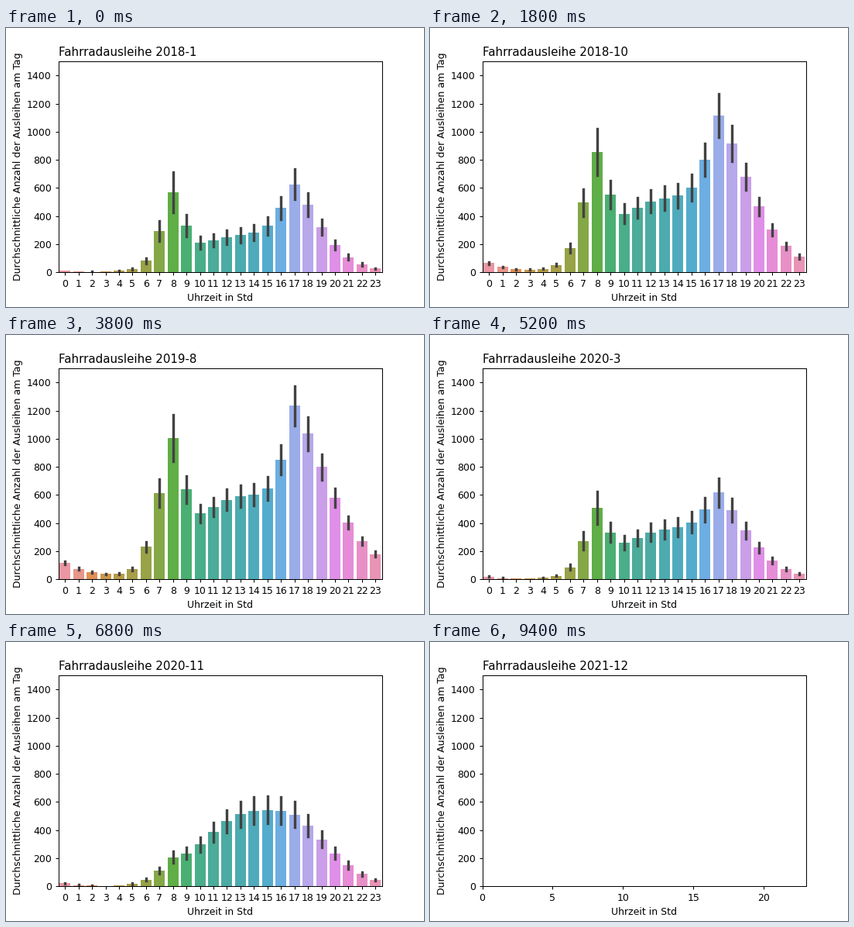
A matplotlib script for the animation above (9.6 s loop, 540x360 px).

```python
import colorsys
import math

import matplotlib.pyplot as plt
import numpy as np
from matplotlib.animation import FuncAnimation

HOURS = np.arange(24)
MONTHS = 48
FIRST_YEAR = 2018
NO_DATA = {27, 45, 46, 47}


def linear_rgb(hue, chroma, light):
    """CIE LCh(uv) to linear sRGB."""
    a = math.radians(hue)
    u = chroma * math.cos(a) / (13 * light) + 0.19784
    v = chroma * math.sin(a) / (13 * light) + 0.46834
    y = ((light + 16) / 116) ** 3
    x = y * 9 * u / (4 * v)
    z = y * (12 - 3 * u - 20 * v) / (4 * v)
    return np.array([
        3.2406 * x - 1.5372 * y - 0.4986 * z,
        -0.9689 * x + 1.8758 * y + 0.0415 * z,
        0.0557 * x - 0.2040 * y + 1.0570 * z,
    ])


def bar_color(i, sat=0.9 * 99, light=0.7 * 99):
    """Evenly spaced hue at constant lightness, slightly desaturated."""
    hue = (i / 24 + 0.01) % 1 * 359
    low, high = 0.0, 250.0
    for _ in range(40):
        mid = (low + high) / 2
        rgb = linear_rgb(hue, mid, light)
        if rgb.min() >= 0 and rgb.max() <= 1:
            low = mid
        else:
            high = mid
    lin = np.clip(linear_rgb(hue, low * sat / 100, light), 0, 1)
    rgb = np.where(lin <= 0.0031308, 12.92 * lin, 1.055 * lin ** (1 / 2.4) - 0.055)
    h, l, s = colorsys.rgb_to_hls(*rgb)
    return colorsys.hls_to_rgb(h, l, s * 0.75)


def bump(center, left, right, power):
    """Lopsided peak of height 1 that wraps around midnight."""
    d = (HOURS - center + 12) % 24 - 12
    return np.exp(-(np.abs(d) / np.where(d < 0, left, right)) ** power)


def mix(a, b, t):
    return a + (b - a) * t


def month_data(m):
    """Hourly means and error half-heights from commute and daytime traffic."""
    summer = (1 - math.cos(2 * math.pi * (m - 0.3) / 12)) / 2
    lockdown = np.interp(m, [25, 26, 27], [0, 0.3, 1])
    growth = (1 - 0.26 * (m // 12)) * summer

    morning = mix(465 + 318 * summer, 50 + 90 * summer, lockdown)
    midday = mix(255 + 466 * growth, 340 + 350 * math.sqrt(summer), lockdown)
    evening = mix(435 + 517 * growth, 350 * summer ** 2, lockdown)

    morning *= bump(8, 1.22 + 0.28 * summer, 1.05, 1.7)
    midday *= bump(13.5 + 1.1 * lockdown, 5.66, 5.66, 2.4)
    evening *= bump(17, 1.38 - 0.28 * summer, 2.6 + 1.7 * summer, 1.4)

    means = morning + midday + evening
    errors = (0.26 * morning + 0.2 * midday + 0.16 * evening) * (1 - 0.35 * summer)
    return means, errors


fig, ax = plt.subplots(figsize=(6, 4), dpi=90)
fig.subplots_adjust(left=0.125, right=0.9, bottom=0.125, top=0.88)
ax.set_ylim(0, 1500)
ax.set_xlabel("Uhrzeit in Std")
ax.set_ylabel("Durchschnittliche Anzahl der Ausleihen am Tag")

bars = ax.bar(HOURS, 0, width=0.8, color=[bar_color(i) for i in HOURS])
whiskers = [ax.plot([h, h], [0, 0], color="0.26", lw=2.7)[0] for h in HOURS]


def update(m):
    ax.set_title(f"Fahrradausleihe {FIRST_YEAR + m // 12}-{m % 12 + 1}", loc="left")
    has_data = m not in NO_DATA
    ax.set_xticks(HOURS if has_data else range(0, 24, 5))
    ax.set_xlim((-0.5, 23.5) if has_data else (0, 23))
    for bar, line, mean, err in zip(bars, whiskers, *month_data(m)):
        bar.set_height(mean)
        line.set_ydata([mean - err, mean + err])
        bar.set_visible(has_data)
        line.set_visible(has_data)
    return []


anim = FuncAnimation(fig, update, frames=MONTHS, interval=200,
                     init_func=lambda: update(0), repeat=True, repeat_delay=0)
plt.show()
```
